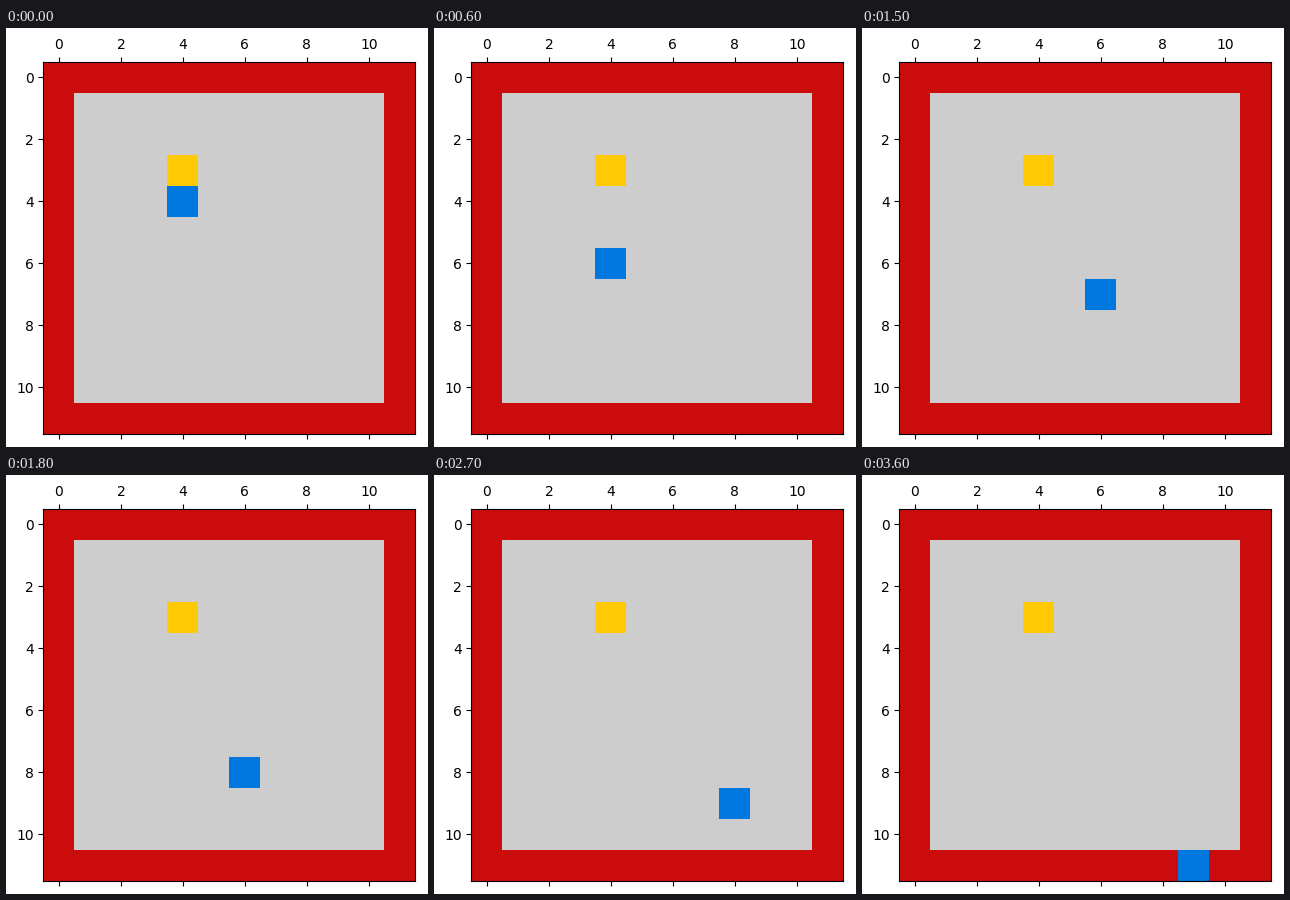
Animation of 422 by 419 pixels, one loop 3900 ms. Source, as a matplotlib script:

```python
import numpy as np
import matplotlib.pyplot as plt
from matplotlib.animation import FuncAnimation
from matplotlib.colors import ListedColormap

W, H, DPI = 422, 419, 100
N, CELL = 12, 31
LEFT, BOTTOM = 37.4, 13.4
STEPS, INTERVAL = 13, 300

FLOOR, WALL, START, BALL = range(4)
COLORS = ListedColormap(["#cdcdcd", "#cb0c0d", "#ffc905", "#0078e0"])


def ball_cell(step):
    """Two steps down, then right and down in turn."""
    if step < 2:
        return 4 + step, 4
    k = step - 2
    return 6 + k // 2, 4 + (k + 1) // 2


def board(step):
    grid = np.full((N, N), WALL)
    grid[1:-1, 1:-1] = FLOOR
    grid[3, 4] = START
    grid[ball_cell(step)] = BALL
    return grid


fig = plt.figure(figsize=(W / DPI, H / DPI), dpi=DPI, facecolor="white")
side = N * CELL
ax = fig.add_axes([LEFT / W, BOTTOM / H, side / W, side / H])
image = ax.imshow(board(0), cmap=COLORS, vmin=-0.5, vmax=3.5,
                  interpolation="nearest", aspect="auto")
ax.set_xticks(range(0, N, 2))
ax.set_yticks(range(0, N, 2))
ax.tick_params(axis="x", top=True, bottom=True, labeltop=True, labelbottom=False)


def update(step):
    image.set_data(board(step))
    return (image,)


anim = FuncAnimation(fig, update, frames=STEPS, interval=INTERVAL,
                     repeat=True, repeat_delay=0)
plt.show()
```
